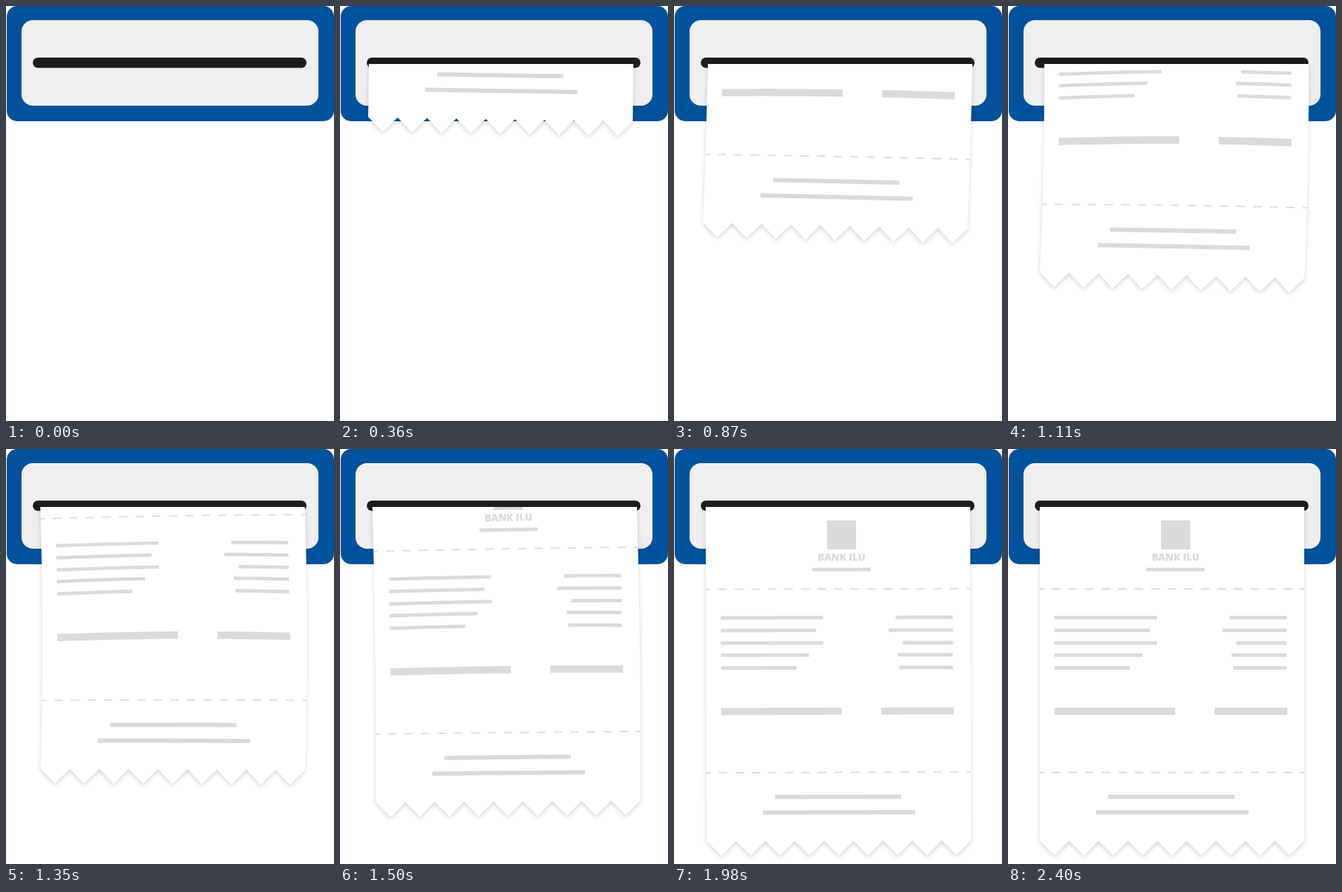
Animation of 465x587 px, one loop 3.6 s. Source, as an HTML page with a canvas:

```html
<!DOCTYPE html>
<html lang="en">
<head>
<meta charset="utf-8">
<title>Receipt printer</title>
<style>
html, body { margin: 0; width: 100%; height: 100%; overflow: hidden; background: #fff; }
canvas { display: block; width: 465px; height: 587px; }
</style>
</head>
<body>
<canvas id="stage"></canvas>
<script>
const W = 465, H = 587, LOOP = 3600, STEP = 30;
const LEFT = 45, RIGHT = 420, BOTTOM = 554, SLOT = 82, MID = 232.5, HALF = 187.5;
const INK = '#dadada';

const canvas = document.getElementById('stage');
const ctx = canvas.getContext('2d');
const dpr = window.devicePixelRatio || 1;
canvas.width = W * dpr;
canvas.height = H * dpr;

// Sheet travel: time, vertical offset
const FEED = [[0, -501], [360, -394], [870, -243.5], [1110, -173.5], [1350, -101], [1650, -10.2], [1684, 0]];

// Sheet bend: time, sway (constant, linear, square), tilt (constant, linear), bulge
const BEND = [
  [0, -4, 1, 0, 2, 0, 0],
  [360, -5, 1.2, 0, 3, 0.3, 0],
  [870, -4, 4, -0.38, 4.6, 1.1, 5.6],
  [1110, 0.2, 4.5, -0.8, 4.2, 1.8, 9.8],
  [1350, 4, 3, -0.84, 1, 1.1, 8.2],
  [1650, 7, -1.55, 0, -3, 0, 1.2]
];
const SETTLED = 2400;

function feedAt(t) {
  const i = FEED.findIndex(k => k[0] > t);
  if (i < 0) return 0;
  const [t0, y0] = FEED[i - 1], [t1, y1] = FEED[i];
  return y0 + (y1 - y0) * (t - t0) / (t1 - t0);
}

function slope(i, c) {
  if (i === 0 || i === BEND.length - 1) return 0;
  const a = BEND[i - 1], b = BEND[i + 1];
  return (b[c] - a[c]) / (b[0] - a[0]);
}

function bendAt(t) {
  const last = BEND[BEND.length - 1];
  if (t >= last[0]) {
    const rest = Math.max(0, (SETTLED - t) / (SETTLED - last[0]));
    return last.slice(1).map(v => v * rest ** 3);
  }
  const i = BEND.findIndex(k => k[0] > t) - 1;
  const a = BEND[i], b = BEND[i + 1], d = b[0] - a[0], u = (t - a[0]) / d;
  const h = u * u * (3 - 2 * u);
  return a.slice(1).map((v, n) => {
    const c = n + 1;
    return v + (b[c] - v) * h
      + d * slope(i, c) * u * (1 - u) ** 2
      - d * slope(i + 1, c) * u * u * (1 - u);
  });
}

// Maps a point of the flat sheet to the bent one
function makeWarp(t) {
  const feed = feedAt(t);
  const [p0, p1, p2, a, b, bulge] = bendAt(t);
  return (x, y) => {
    const s = (BOTTOM - y) / 100, u = (x - MID) / HALF;
    const lift = bulge * Math.exp(-(((y - 320) / 110) ** 2));
    return [
      x + p0 + p1 * s + p2 * s * s,
      y + feed + (a - b * s) * u - lift * (1 - u * u / 2)
    ];
  };
}

function trace(points, warp) {
  ctx.beginPath();
  for (const [x, y] of points) ctx.lineTo(...warp(x, y));
}

function bar(warp, x0, x1, y, h) {
  const n = 12, top = [], low = [];
  for (let i = 0; i <= n; i++) {
    const x = x0 + (x1 - x0) * i / n;
    top.push([x, y - h / 2]);
    low.unshift([x, y + h / 2]);
  }
  trace(top.concat(low), warp);
  ctx.fill();
}

function perforation(warp, y) {
  const points = [];
  for (let i = 0; i <= 32; i++) points.push([LEFT + (RIGHT - LEFT) * i / 32, y]);
  trace(points, warp);
  const period = (RIGHT - LEFT) / 16;
  ctx.setLineDash([12, period - 12]);
  ctx.lineDashOffset = 6;
  ctx.lineWidth = 1.8;
  ctx.strokeStyle = INK;
  ctx.stroke();
  ctx.setLineDash([]);
}

function sheet(warp, top) {
  const points = [];
  for (let i = 0; i <= 30; i++) points.push([LEFT, top + (BOTTOM - top) * i / 30]);
  const tooth = (RIGHT - LEFT) / 9;
  for (let i = 0; i < 9; i++) {
    points.push([LEFT + tooth * (i + 0.5), BOTTOM + 21], [LEFT + tooth * (i + 1), BOTTOM]);
  }
  for (let i = 29; i >= 0; i--) points.push([RIGHT, top + (BOTTOM - top) * i / 30]);
  trace(points, warp);
  ctx.save();
  ctx.shadowColor = 'rgba(0,0,0,0.17)';
  ctx.shadowBlur = 6 * dpr;
  ctx.shadowOffsetY = 2.5 * dpr;
  ctx.fillStyle = '#fff';
  ctx.fill();
  ctx.restore();
}

function heading(warp) {
  bar(warp, 217, 258, 121.5, 41);
  const [x, y] = warp(237.5, 158), [x1, y1] = warp(257.5, 158);
  ctx.save();
  ctx.translate(x, y);
  ctx.rotate(Math.atan2(y1 - y, x1 - x));
  ctx.font = '800 14px "Open Sans", sans-serif';
  ctx.textAlign = 'center';
  ctx.fillText('BANK ILU', 0, 0);
  ctx.restore();
  bar(warp, 196, 278.5, 170.5, 5);
}

function box(x, y, w, h, r, fill) {
  ctx.beginPath();
  ctx.roundRect(x, y, w, h, r);
  ctx.fillStyle = fill;
  ctx.fill();
}

// Row: end of the left bar, start of the right bar, y
const ROWS = [[211, 314, 238.5], [201, 304, 256.5], [211, 324, 274.5], [191, 317, 291.5], [173, 319, 309.5]];

function draw(t) {
  ctx.setTransform(dpr, 0, 0, dpr, 0, 0);
  ctx.fillStyle = '#fff';
  ctx.fillRect(0, 0, W, H);
  box(1, 0, 464, 163, 15, '#00529c');
  box(22, 20, 421, 121, 16, '#efefef');
  box(38, 73, 388, 14.5, 7.25, '#1c1c1c');
  if (t < STEP) return;

  const warp = makeWarp(t);
  ctx.save();
  ctx.beginPath();
  ctx.rect(0, SLOT, W, H - SLOT);
  ctx.clip();
  sheet(warp, SLOT - feedAt(t) - 20);

  ctx.fillStyle = INK;
  heading(warp);
  for (const [end, start, y] of ROWS) {
    bar(warp, 66, end, y, 5);
    bar(warp, start, 395, y, 5);
  }
  bar(warp, 66, 237, 371, 10);
  bar(warp, 293, 396, 371, 10);
  bar(warp, 142, 321, 492, 6);
  bar(warp, 125, 341, 514, 6);
  perforation(warp, 198);
  perforation(warp, 457.5);
  ctx.restore();
}

const begin = performance.now();
function tick() {
  const t = (performance.now() - begin) % LOOP;
  draw(Math.floor(t / STEP) * STEP);
  requestAnimationFrame(tick);
}
tick();
</script>
</body>
</html>
```
